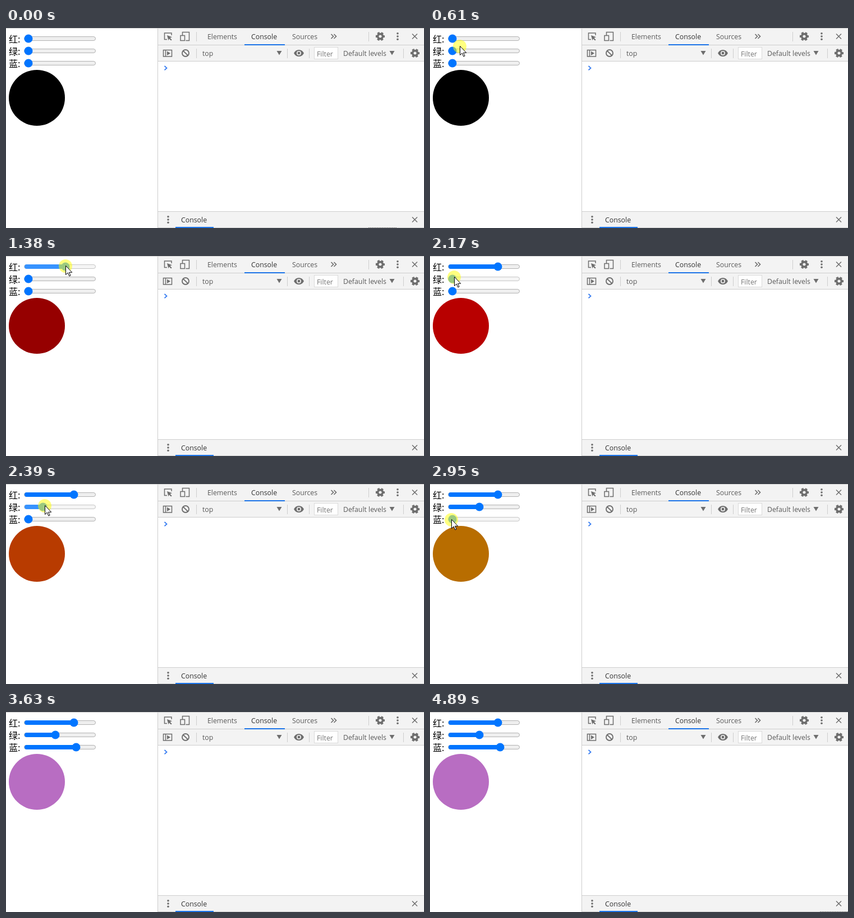
An HTML page for the animation above (4960 ms loop, 745 by 358 pixels).

```html
<!DOCTYPE html>
<html lang="zh">
<head>
<meta charset="utf-8">
<title>RGB sliders</title>
<style>
  html, body { margin: 0; height: 100%; overflow: hidden; background: #fff; }
  svg { display: block; width: 100%; height: 100%; }
  .ui { font: 12.3px "Open Sans", "Noto Sans", sans-serif; fill: #5a5a5a; }
  .label { font: 16px "Noto Sans CJK SC", "Noto Sans CJK", sans-serif; fill: #000; }
  .on { fill: #333; }
  .line { fill: none; stroke: #6e6e6e; stroke-width: 1.5; }
  .solid { fill: #6e6e6e; }
  .rule { fill: none; stroke: #cdcdcd; }
</style>
</head>
<body>
<svg viewBox="0 0 745 358">
  <defs>
    <g id="gear" fill="none" stroke="#6e6e6e">
      <circle r="4.4" stroke-width="3.6"/>
      <circle r="6.6" stroke-width="3" stroke-dasharray="3.9 3.01" stroke-dashoffset="1.95"/>
    </g>
    <path id="close" class="line" stroke-width="1.8" d="M-4.5-4.5l9 9m0-9l-9 9"/>
    <g id="dots" class="solid"><circle cy="-5.2" r="1.8"/><circle r="1.8"/><circle cy="5.2" r="1.8"/></g>
    <path id="down" class="solid" d="M-4.5-3.5h9L0 4z"/>
  </defs>

  <path fill="#f3f3f3" d="M271 1h474v58H271zM271 329h474v28H271z"/>
  <path class="rule" d="M0 .5h745M270.5 0v358M271 30.5h474M271 59.5h474M271 328.5h474M271 357.5h474"/>
  <path class="rule" d="M339.5 7v17M646.5 7v17M339.5 37v17M501.5 37v17M540.5 37v17M708.5 37v17"/>
  <path fill="#1a73e8" d="M425 29h72v2h-72zM302 356h68v2h-68z"/>
  <rect x="549.5" y="34.5" width="42" height="21" fill="#fff" stroke="#dadada"/>

  <g class="ui">
    <text x="359" y="20">Elements</text>
    <text x="437" y="20" class="on">Console</text>
    <text x="510" y="20">Sources</text>
    <text x="350" y="50">top</text>
    <text x="554" y="51" fill="#757575">Filter</text>
    <text x="601" y="50">Default levels</text>
    <text x="312" y="348" class="on">Console</text>
  </g>

  <g class="line" stroke-width="1.4">
    <path d="M287 20.5h-4.5v-11.500h12.500v4"/>
    <path d="M314.500 13V7.500h12v15h-6M311 13.500h7.500v9H311z"/>
    <path d="M579.500 11l4 4-4 4M584.500 11l4 4-4 4" stroke-width="1.7"/>
    <path d="M280.500 39.500h15v11.500h-15zM284.500 39.500v11.500"/>
    <circle cx="320" cy="45" r="6" stroke-width="1.9"/>
    <path d="M315.800 40.800l8.400 8.400" stroke-width="1.9"/>
  </g>
  <g class="solid">
    <path d="M287 13l9 3.300-3.600 1.500 3.200 3.200-1.500 1.500-3.200-3.200-1.400 3z"/>
    <path d="M287 41.500l6 3.800-6 3.700z"/>
    <path fill-rule="evenodd" d="M513 45q3-6 9-6t9 6q-3 6-9 6t-9-6zM526 45a4 4 0 1 0-8 0a4 4 0 1 0 8 0z"/>
    <circle cx="522" cy="45" r="2.400"/>
  </g>
  <use href="#gear" x="667" y="15"/><use href="#gear" x="729" y="45"/>
  <use href="#dots" x="698" y="15"/><use href="#dots" x="289" y="343"/>
  <use href="#close" x="728.5" y="15"/><use href="#close" x="728.5" y="343"/>
  <use href="#down" x="487" y="44.500"/><use href="#down" x="688" y="44.500"/>
  <path d="M282.500 68l4 3.700-4 3.700" fill="none" stroke="#367cf1" stroke-width="1.8"/>
  <path id="dash" d="M0 357.500h50" stroke="#777" stroke-dasharray="2 1"/>

  <g id="sliders"></g>
  <circle id="ball" cx="55" cy="125" r="50"/>
  <g id="cursor">
    <circle cy="1" r="12" fill="#ff0" fill-opacity=".5"/>
    <path d="M.5.5v16l3.700-3.500 2.600 6 2.300-1-2.600-5.700h5.200z" fill="#fff" stroke="#000"/>
  </g>
</svg>
<script>
const LOOP = 4960, START = 70, STEP = 540 / 7;
const MIN = 40, RANGE = 112;
const $ = id => document.getElementById(id);

// Keys: [step, value, ...]
const pointer = [
  [0, 499, 251], [6, 59, 39], [9, 41, 18], [10, 45, 17], [12, 62, 17], [17, 106, 17],
  [19, 121, 20], [20, 121, 23], [22, 108, 28], [26, 46, 37], [27, 43, 37], [28, 47, 37],
  [32, 91, 39], [34, 58, 63], [36, 38, 64], [37, 38, 63], [41, 123, 63], [43, 123, 63],
  [44, 170, 120], [45, 295, 298]
];
const channels = [
  { name: '红', y: 19, down: 9, up: 20, keys: [[9, 40], [10, 44], [12, 61], [17, 106], [19, 121]] },
  { name: '绿', y: 41, down: 27, up: 32, keys: [[27, 40], [28, 44], [32, 88]] },
  { name: '蓝', y: 63, down: 37, up: 43, keys: [[37, 40], [41, 125]] }
];

function at(keys, n) {
  if (n <= keys[0][0]) return keys[0].slice(1);
  const i = keys.findIndex(k => k[0] >= n);
  if (i < 0) return keys[keys.length - 1].slice(1);
  const [a, b] = [keys[i - 1], keys[i]];
  const f = (n - a[0]) / (b[0] - a[0]);
  return a.slice(1).map((v, j) => v + (b[j + 1] - v) * f);
}

$('sliders').innerHTML = channels.map(({ name, y }) => `<g>
  <text class="label" x="5" y="${y + 7}">${name}:</text>
  <rect x="32.5" y="${y - 3.5}" width="127" height="7" rx="3.5"/>
  <rect x="33" y="${y - 4}" height="8" rx="4"/>
  <circle cy="${y}" r="7.5"/></g>`).join('');
channels.forEach((c, i) => {
  [, c.track, c.fill, c.thumb] = $('sliders').children[i].children;
});

function drawSlider(c, n) {
  const [x] = at(c.keys, n), active = n >= c.down && n <= c.up;
  const accent = active ? '#3793ff' : '#0075ff';
  c.track.setAttribute('fill', active ? '#f5f5f5' : '#efefef');
  c.track.setAttribute('stroke', active ? '#c6c6c6' : '#b2b2b2');
  c.fill.setAttribute('width', x - 33);
  c.fill.setAttribute('fill', accent);
  c.thumb.setAttribute('cx', x);
  c.thumb.setAttribute('fill', accent);
  return Math.round((x - MIN) / RANGE * 255);
}

function draw(now) {
  const t = now % LOOP;
  const n = Math.floor((t - START) / STEP + 0.1);
  $('ball').setAttribute('fill', `rgb(${channels.map(c => drawSlider(c, n))})`);

  const [x, y] = at(pointer, n).map(Math.round);
  $('cursor').setAttribute('transform', `translate(${x} ${y})`);
  $('cursor').style.display = t >= START && n <= 45 ? '' : 'none';

  const late = t >= 4890;
  $('dash').style.display = late || n < 7 ? '' : 'none';
  $('dash').setAttribute('transform', `translate(${late ? 695 : 646} 0)`);
  requestAnimationFrame(draw);
}
draw(0);
</script>
</body>
</html>
```
